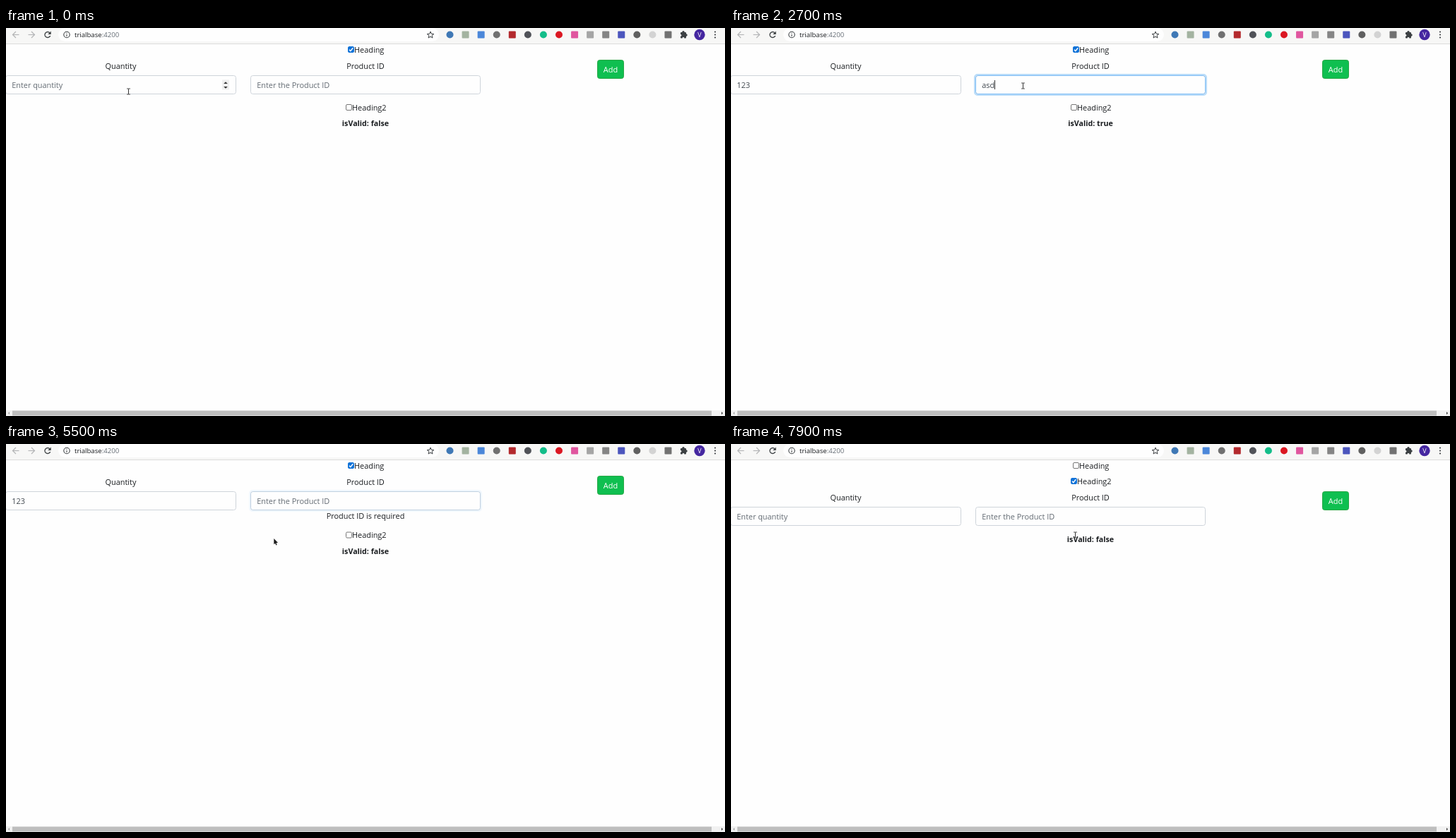
Recreate the animation shown at these times as an HTML page with a canvas. Size 1018x550 px, loop 8 s.

```html
<!DOCTYPE html>
<html lang="en">
<head>
<meta charset="utf-8">
<title>Order form</title>
<style>
html, body { margin: 0; width: 100%; height: 100%; overflow: hidden; background: #fefefe; }
canvas { display: block; }
</style>
</head>
<body>
<canvas id="stage" width="1018" height="550"></canvas>
<script>
const c = document.getElementById('stage').getContext('2d');
const LOOP = 8000, STEP = 100;
const INK = '#1a1d20', MUTED = '#636b73', ICON = '#3c4043', PAGE = '#fefefe';

// Pointer moves: start time, end time, and the point it reaches
const START = { x: 173, y: 90 };
const moves = [
  [200, 400, 185, 79], [1200, 1600, 256, 135], [1700, 1800, 423, 173],
  [2000, 2300, 413, 82], [2800, 3200, 415, 152], [3300, 3500, 410, 70],
  [3500, 4200, 317, 80], [4200, 4700, 381, 161], [4700, 5200, 398, 145],
  [5300, 6200, 311, 95], [6300, 6400, 67, 66], [6400, 7200, 467, 133],
  [7200, 7600, 487, 129]
];

// Toolbar buttons, evenly spaced: o = round, s = square
const buttonShapes = 'ossosooossssoos';
const buttonColors = ['#3f78b5', '#a3b3a0', '#4b87d9', '#707070', '#b3292d',
  '#505258', '#13bd89', '#db1722', '#e0569f', '#a5a5a5', '#858585', '#4c56bd',
  '#606060', '#d3d3d3', '#727272'];

const clamp = v => Math.max(0, Math.min(1, v));
const between = (t, a, b) => t >= a && t < b;
const typed = (word, start, gap, t) =>
  t < start ? '' : word.slice(0, 1 + Math.floor((t - start) / gap));
// Focus ring fades over 150 ms at both ends
const glow = (t, a, b) => clamp((t - a) / 150) * (1 - clamp((t - b) / 150));

function pointerAt(t) {
  let { x, y } = START;
  for (const [a, b, toX, toY] of moves) {
    const p = clamp((t - a) / (b - a));
    x += (toX - x) * p;
    y += (toY - y) * p;
  }
  return { x, y };
}

function paint(fill, stroke, width = 1) {
  if (fill) { c.fillStyle = fill; c.fill(); }
  if (stroke) { c.strokeStyle = stroke; c.lineWidth = width; c.stroke(); }
}

function rect(x, y, w, h, fill) {
  c.fillStyle = fill;
  c.fillRect(x, y, w, h);
}

function box(x, y, w, h, r, fill, stroke, width) {
  c.beginPath();
  c.roundRect(x, y, w, h, r);
  paint(fill, stroke, width);
}

function disc(x, y, r, fill, stroke, width) {
  c.beginPath();
  c.arc(x, y, r, 0, 7);
  paint(fill, stroke, width);
}

function poly(points, fill, stroke, width, open) {
  c.beginPath();
  points.forEach(p => c.lineTo(...p));
  if (!open) c.closePath();
  paint(fill, stroke, width);
}

// Filled triangle pointing along (dx, dy)
function triangle(x, y, r, dx, dy, fill) {
  poly([[x + dx * r, y + dy * r], [x + dy * r, y + dx * r], [x - dy * r, y - dx * r]], fill);
}

function text(s, x, y, color = INK, align = 'left', size = 10.9, weight = 400) {
  c.font = `${weight} ${size}px "Open Sans", "Noto Sans", sans-serif`;
  c.textAlign = align;
  c.fillStyle = color;
  c.fillText(s, x, y);
  return c.measureText(s).width;
}

function navArrow(x, dir) {
  const tip = x + 4.5 * dir, color = '#b4b5b7';
  poly([[x - 4.5 * dir, 9.5], [tip, 9.5]], null, color, 1.2, true);
  poly([[x, 5], [tip, 9.5], [x, 14]], null, color, 1.2, true);
}

function toolbar() {
  rect(0, 0, 1018, 22, '#f7f7f6');
  rect(0, 22, 1018, 1, '#dcdcdb');
  box(74, 0, 539, 19, 9.5, PAGE);
  navArrow(14, -1);
  navArrow(36, 1);

  c.beginPath();
  c.arc(59, 9.5, 4, .4, 5.5);
  paint(null, ICON, 1.4);
  poly([[63.7, 4.5], [63.7, 9], [59.3, 9]], ICON);

  disc(86, 9.5, 4.2, null, ICON, 1.1);
  rect(85.5, 9, 1, 3, ICON);
  rect(85.5, 7, 1, 1, ICON);
  const w = text('trialbase', 97, 13, INK, 'left', 9.6);
  text(':4200', 97 + w, 13, MUTED, 'left', 9.6);

  const star = Array.from({ length: 10 }, (_, i) => {
    const a = i * Math.PI / 5, r = i % 2 ? 2.2 : 5;
    return [601 + r * Math.sin(a), 10 - r * Math.cos(a)];
  });
  poly(star, null, ICON);

  buttonColors.forEach((color, i) => {
    const x = 628.5 + 22.07 * i;
    if (buttonShapes[i] === 'o') disc(x, 9.5, 5, color);
    else box(x - 5, 4.5, 10, 10, 1, color);
  });

  // Puzzle piece
  box(955, 6, 8, 8.5, 1, ICON);
  disc(959, 5.8, 1.7, ICON);
  disc(963, 10, 1.7, ICON);
  disc(955, 10.4, 1.4, '#f7f7f6');
  disc(959, 14.5, 1.4, '#f7f7f6');

  disc(982, 9.5, 7.7, '#4527a0');
  text('V', 982, 12.8, '#fff', 'center', 9);
  for (let i = -1; i < 2; i++) disc(1004, 9.5 + 4 * i, 1.1, ICON);
}

function scrollbar() {
  rect(0, 542, 1018, 8, '#f1f1f1');
  rect(9, 542.5, 990, 7, '#bebebe');
  triangle(5, 546, 2, -1, 0, '#a0a0a0');
  triangle(1013, 546, 2, 1, 0, '#333');
}

function checkbox(x, y, checked, label) {
  const edge = checked ? '#1273d8' : '#767676';
  box(x + .5, y + .5, 8, 8, 1.5, checked ? edge : '#fff', edge);
  if (checked) {
    poly([[x + 2, y + 4.7], [x + 3.8, y + 6.6], [x + 7.2, y + 2.3]], null, '#fff', 1.4, true);
  }
  text(label, x + 9, y + 8.8);
}

function field({ x, y, w, value, hint, ring, caret, selected }) {
  box(x, y, w, 26, 3, PAGE, '#ced4da');
  c.globalAlpha = ring;
  box(x - 1.5, y - 1.5, w + 3, 29, 4, null, '#b9dcf9', 2);
  box(x, y, w, 26, 3, null, '#80bdf5');
  c.globalAlpha = 1;

  const left = x + 8.7;
  if (selected) rect(left, y + 6.5, 17.5, 13, '#d8352c');
  const color = selected ? '#fff' : value ? '#41484f' : MUTED;
  const width = text(value || hint, left, y + 17, color);
  if (caret) rect(Math.round(left + (value ? width : 0) - .3), y + 6.5, 1, 13, '#333');
}

function spinner(y) {
  rect(306, y + 6, 10, 14, '#efefef');
  triangle(311, y + 11.5, 2.8, 0, -1, '#333');
  triangle(311, y + 15.5, 2.8, 0, 1, '#333');
}

function pointer({ x, y }, beam) {
  c.save();
  c.translate(Math.round(x), Math.round(y));
  if (beam) {
    rect(0, -4, 1, 8, '#333');
    for (const end of [-4.5, 3.5]) rect(-2, end, 5, 1, '#555');
  } else {
    const arrow = [[.3, 0], [.3, 8.3], [2.1, 6.7], [3.4, 9.6], [4.7, 9], [3.5, 6.3], [6, 6]];
    poly(arrow, null, '#fff');
    poly(arrow, '#1c1c1c');
  }
  c.restore();
}

function draw(t) {
  const swapped = t >= 7800, error = between(t, 4900, 7800);
  const shift = swapped ? 22 : 0, drop = error ? 16.5 : 0;
  const top = 67.5 + shift, validY = 135 + drop;
  const quantity = swapped ? '' : typed('123', 1100, 150, t);
  const product = t < 4900 ? typed('asd', 2500, 100, t) : '';
  const onQuantity = between(t, 580, 1750);
  const onProduct = between(t, 2280, 3150) || between(t, 3750, 5380);
  const selected = between(t, 4000, 4900);

  rect(0, 0, 1018, 550, PAGE);
  toolbar();
  scrollbar();

  checkbox(484, 26, !swapped, 'Heading');
  checkbox(481, swapped ? 48 : 108 + drop, swapped, 'Heading2');
  text('Quantity', 162.5, 57.5 + shift, INK, 'center');
  text('Product ID', 509, 57.5 + shift, INK, 'center');

  field({ x: -.5, y: top, w: 326, value: quantity, hint: 'Enter quantity',
    ring: glow(t, 580, 1750), caret: onQuantity });
  field({ x: 346.5, y: top, w: 325, value: product, hint: 'Enter the Product ID',
    ring: glow(t, 2280, 3150) + glow(t, 3750, 5380),
    caret: onProduct && !selected, selected });

  box(837.5, 45.5 + shift, 37, 26, 3, '#0fbf50', '#28a745');
  text('Add', 856, 62.5 + shift, '#fff', 'center', 11);

  if (error) text('Product ID is required', 509, 106, INK, 'center');
  text('isValid: ' + (product !== ''), 509, validY + 4, INK, 'center', 10.7, 700);

  // The pointer's shape follows its place one step late
  const inRow = (y, margin) => between(y, top - margin, top + 26 + margin);
  const mouse = pointerAt(t), late = pointerAt(t - STEP);
  const overField = inRow(late.y, 3) && late.x < 672;
  const overText = Math.abs(late.x - 509) < 33 && Math.abs(late.y - validY) < 8;
  if (onQuantity || mouse.x < 325 && inRow(mouse.y, 0)) spinner(top);
  pointer(mouse, overField || overText);
}

function frame() {
  const t = performance.now() % LOOP;
  draw(Math.floor(t / STEP) * STEP);
  requestAnimationFrame(frame);
}
frame();
</script>
</body>
</html>
```
